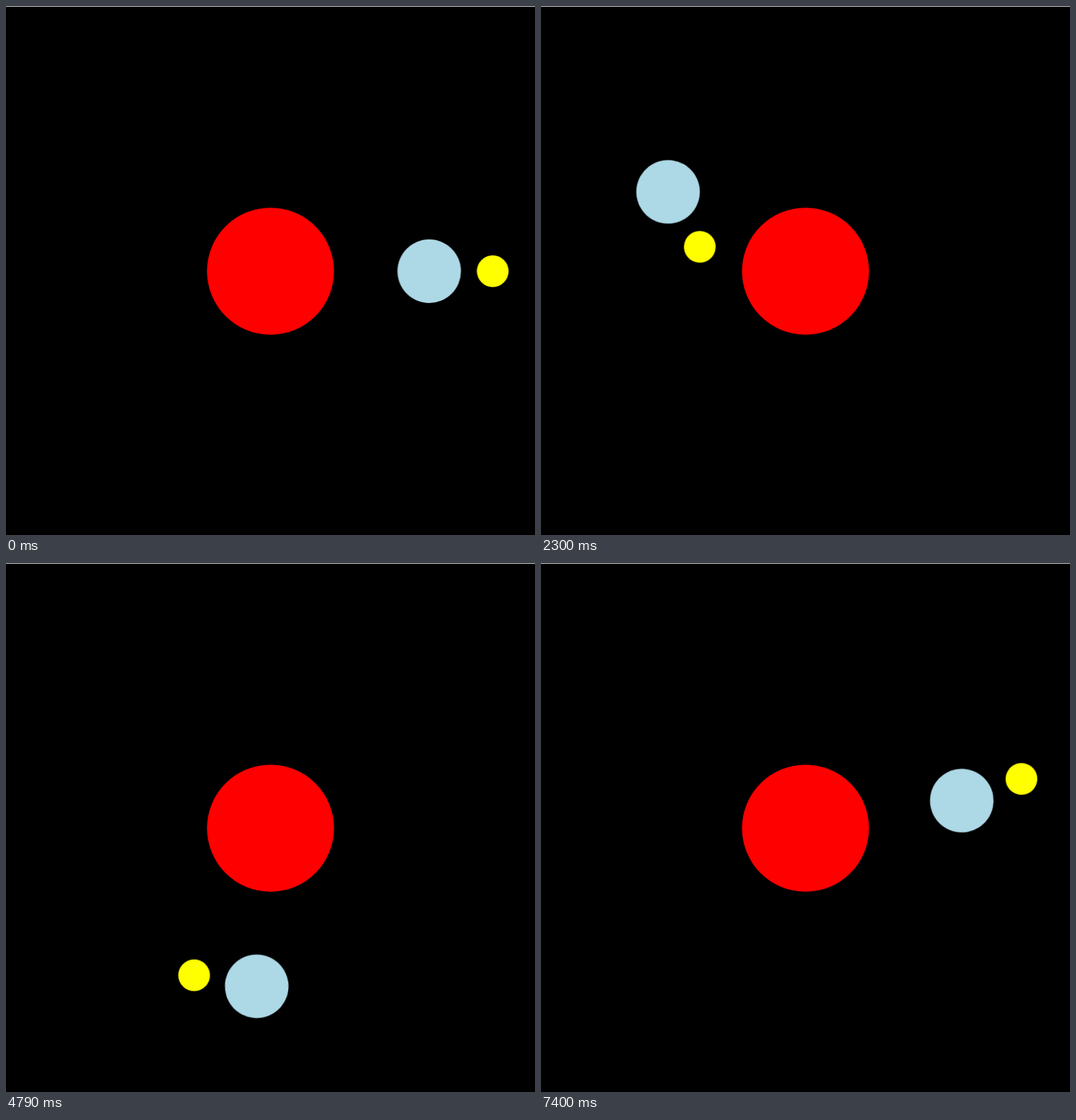
Animation of 748 by 748 pixels, one loop 7.45 s. Source, as an HTML page:

```html
<!DOCTYPE html>
<html lang="en">
<head>
<meta charset="utf-8">
<title>Orbits</title>
<style>
  html, body { margin: 0; width: 100%; height: 100%; overflow: hidden; background: #000; }
  svg { display: block; width: 748px; height: 748px; }
  .orbit { transform-origin: 0 0; }
</style>
</head>
<body>
<svg viewBox="0 0 748 748">
  <rect width="748" height="748"/>
  <rect width="748" height="1" fill="#ccc"/>
  <g transform="translate(374 375)">
    <circle r="89.8" fill="red"/>
    <g class="orbit">
      <g transform="translate(224.4 0)">
        <circle r="44.9" fill="lightblue"/>
        <g class="orbit">
          <circle cx="89.8" r="22.44" fill="yellow"/>
        </g>
      </g>
    </g>
  </g>
</svg>
<script>
  const LOOP = 7450;
  const FIRST_STEP = 210;
  const INTERVAL = 50.85;
  const STEPS = 142;
  const DEGREES = 5;

  const start = (FIRST_STEP - INTERVAL) / LOOP;
  const end = start + STEPS * INTERVAL / LOOP;
  const rest = 'rotate(0deg)';
  const turned = `rotate(${STEPS * DEGREES}deg)`;

  const keyframes = [
    { offset: 0, transform: rest },
    { offset: start, transform: rest, easing: `steps(${STEPS}, end)` },
    { offset: end, transform: turned },
    { offset: 1, transform: turned }
  ];

  // The nested orbit inherits the outer turn, so the moon turns twice as fast.
  for (const orbit of document.querySelectorAll('.orbit')) {
    orbit.animate(keyframes, { duration: LOOP, iterations: Infinity });
  }
</script>
</body>
</html>
```
